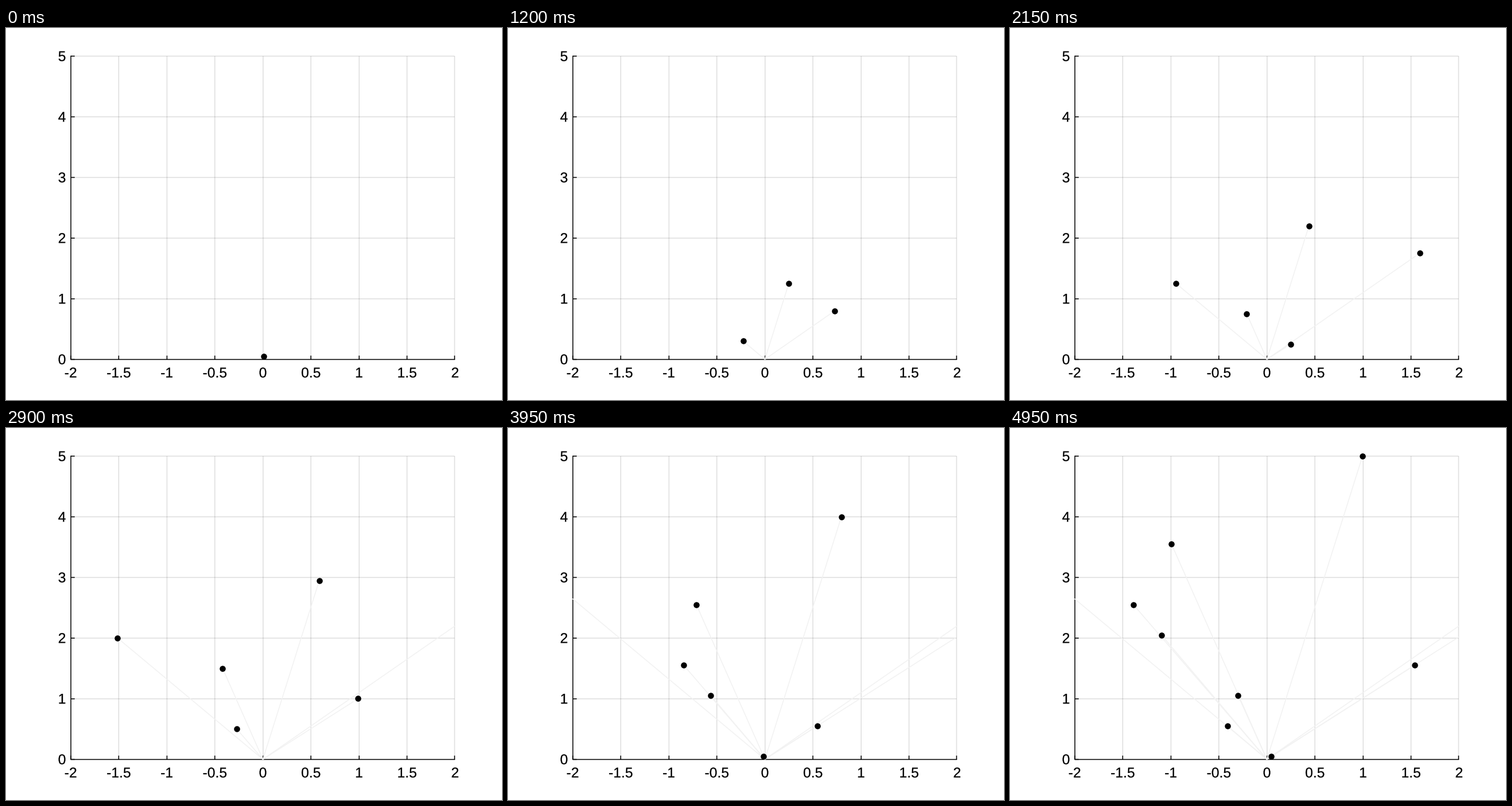
Write a matplotlib script that moves like this. It is 864 by 648 pixels and loops after 5 s.

```python
import matplotlib.pyplot as plt
import numpy as np
from matplotlib.animation import FuncAnimation
from matplotlib.patches import PathPatch
from matplotlib.textpath import TextPath

W, H, DPI = 864, 648, 72        # at 72 dpi one point is one pixel
FRAMES, INTERVAL = 100, 50
STEP = 0.05                     # rise per frame
X_MAX, Y_MAX = 2, 5

# The plot is laid out on a finer 1120 x 840 canvas and scaled to the stage
SCALE = 1120 / W
HALF = 0.5 / SCALE              # half a canvas pixel
LINE = 2 / SCALE
TICK = 8.7 / SCALE
FONT = 32 / SCALE
RIGHT_EDGE = 781.4
GRID = (0.15, 0.15, 0.15, 0.15)

# Sideways drift per unit of height, in order of launch
SLOPES = [0.199, 0.909, -0.756, -0.2797, 0.990, -0.5447,
          -0.5353, 0.991, -0.2856, -0.748, 0.908]
STARTS = [max(0, 10 * i - 1) for i in range(len(SLOPES))]

fig = plt.figure(figsize=(W / DPI, H / DPI), dpi=DPI, facecolor="white")
ax = fig.add_axes([0, 0, 1, 1])
ax.set_xlim(0, W)
ax.set_ylim(0, H)
ax.axis("off")


def px(x):
    return W * (0.13 + 0.775 * (x + X_MAX) / (2 * X_MAX)) + HALF


def py(y):
    return H * (0.11 + 0.815 * y / Y_MAX) - HALF


def snap(pos):
    """Move a stage position to the centre of its canvas pixel."""
    return round((pos - HALF) * SCALE) / SCALE + HALF


def snap_x(x):
    return min(snap(px(x)), RIGHT_EDGE)


def snap_y(y):
    return H - snap(H - py(y))


def stroke(xs, ys, color="black", cap="butt", zorder=2):
    return ax.plot(xs, ys, color=color, lw=LINE, solid_capstyle=cap,
                   solid_joinstyle="miter", zorder=zorder, snap=False)[0]


def label(x, y, text, align):
    """Write text with its baseline at y; align is the share left of x."""
    digits = sum(c.isdigit() for c in text)
    width = FONT * (0.556 * digits + 0.278 * text.count(".")
                    + 0.333 * text.count("-"))
    path = TextPath((x - align * width, y), text, size=FONT,
                    prop="Liberation Sans")
    ax.add_patch(PathPatch(path, fc="black", ec="black", lw=0.25,
                           snap=False, zorder=2))


def draw_axes():
    left, right = snap_x(-X_MAX), snap_x(X_MAX)
    bottom, top = snap_y(0), snap_y(Y_MAX)
    for value in np.arange(-X_MAX, X_MAX + 0.1, 0.5):
        x = snap_x(value)
        if value > -X_MAX:
            stroke([x, x], [bottom, top], GRID, zorder=1)
        stroke([x, x], [bottom, bottom + TICK])
        label(px(value), py(0) - 31.6, f"{value:g}", 0.5)
    for value in range(Y_MAX + 1):
        y = snap_y(value)
        if value > 0:
            stroke([left, right], [y, y], GRID, zorder=1)
        stroke([left, left + TICK], [y, y])
        label(px(-X_MAX) - 8.3, py(value) - 8.6, str(value), 1)
    stroke([left, left, right], [top, bottom, bottom], cap="projecting")


draw_axes()
trails = [stroke([], [], "0.95", cap="round", zorder=3) for _ in SLOPES]
dots, = ax.plot([], [], "o", color="black", ms=10.5, mew=0, zorder=4,
                snap=False)


def update(frame):
    points = []
    for trail, slope, start in zip(trails, SLOPES, STARTS):
        y = STEP * (frame + 1 - start)
        # The trail reaches the previous position, cut at the plot's edge
        end = min(y - STEP, X_MAX / abs(slope))
        if end > 1e-6:
            trail.set_data([px(0), px(slope * end)], [py(0), py(end)])
        else:
            trail.set_data([], [])
        if y > 1e-6 and abs(slope * y) <= X_MAX:
            points.append((px(slope * y), py(y)))
    dots.set_data(*zip(*points))
    return [*trails, dots]


anim = FuncAnimation(fig, update, frames=FRAMES, interval=INTERVAL,
                     repeat=True, repeat_delay=0, blit=False)
plt.show()
```
